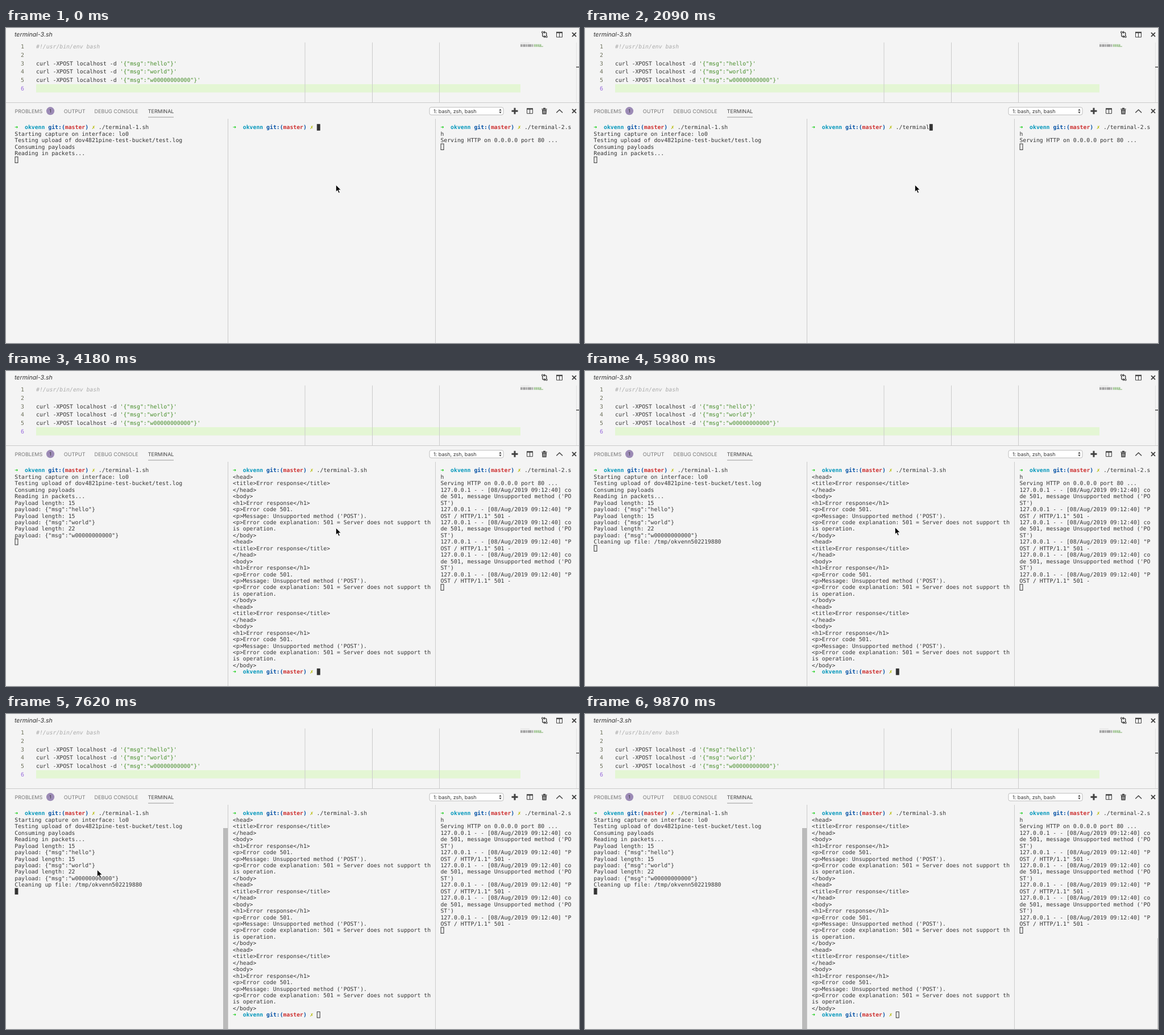
An HTML page for the animation above (9970 ms loop, 1008 px wide and 555 px high).

```html
<!DOCTYPE html>
<html lang="en">
<head>
<meta charset="utf-8">
<title>Terminal session</title>
<style>
html, body { margin: 0; width: 100%; height: 100%; overflow: hidden; background: #f4f4f4; }
svg { display: block; width: 100vw; height: 100vh; }
text { white-space: pre; text-rendering: geometricPrecision; fill: #333; }
.mono { font: 9.8px "DejaVu Sans Mono", "Liberation Mono", monospace; }
.ui { font: 9px Inter, "Open Sans", sans-serif; }
</style>
</head>
<body>
<svg id="stage" viewBox="0 0 1008 555" xmlns="http://www.w3.org/2000/svg"></svg>
<script>
const LOOP = 9970;
const CELL = 5.9, ROW = 11.45, TOP = 169.25, BASE = 9.1;
const INK = '#333', ICON = '#424242', RULE = '#cbcbcb';
const PANES = { left: 15.3, mid: 399.1, right: 764.4 };
const USER = 'okvenn';
const stage = document.getElementById('stage');

function add(parent, tag, attrs, content) {
  const node = document.createElementNS(stage.namespaceURI, tag);
  set(node, attrs);
  if (content !== undefined) node.textContent = content;
  parent.appendChild(node);
  return node;
}
function set(node, attrs) {
  for (const key in attrs) node.setAttribute(key, attrs[key]);
}
function show(node, on) {
  node.style.display = on ? '' : 'none';
}
const group = () => add(stage, 'g', {});
const box = (x, y, width, height, fill, parent = stage) =>
  add(parent, 'rect', { x, y, width, height, fill });
const stroke = (d, width = 1, color = ICON) =>
  add(stage, 'path', { d, fill: 'none', stroke: color, 'stroke-width': width });
const solid = d => add(stage, 'path', { d, fill: ICON });
const mono = (parent, x, y, content, style = '') =>
  add(parent, 'text', { class: 'mono', x, y, style }, content);
const ui = (x, y, content, style = '') =>
  add(stage, 'text', { class: 'ui', x, y, style }, content);

// Terminal text on a character grid
const cell = (parent, pane, col, row, content, style) =>
  mono(parent, PANES[pane] + col * CELL, TOP + BASE + row * ROW, content, style);
function lines(parent, pane, row, list) {
  list.forEach((content, i) => cell(parent, pane, 0, row + i, content));
}
function prompt(parent, pane, row, command = '') {
  const parts = [
    [0, '➜', '#14ce14', 'bold'], [3, USER, '#0598bc', 'bold'],
    [10, 'git:(', '#0451a5', 'bold'], [15, 'master', '#cd3131', 'bold'],
    [21, ')', '#0451a5', 'bold'], [23, '✗', '#b5ba00', 'normal']
  ];
  for (const [col, content, fill, weight] of parts)
    cell(parent, pane, col, row, content, `fill:${fill};font-weight:${weight}`);
  return cell(parent, pane, 25, row, command);
}
const thrice = list => [...list, ...list, ...list];

function drawEditor() {
  ui(15, 15.2, 'terminal-3.sh', 'font-size:10.6px;font-style:italic');
  box(53, 99, 852, 14.5, '#e4f6d4');
  for (const x of [525.5, 644, 762]) box(x, 25.5, 1, 106, RULE);
  const request = 'curl -XPOST localhost -d ';
  const bodies = ['hello', 'world', 'w00000000000'];
  for (let n = 1; n <= 6; n++) {
    const y = 36.1 + (n - 1) * 14.7;
    mono(stage, 26, y, n, `fill:${n === 6 ? '#9769dc' : '#6d705b'}`);
    if (n === 1) mono(stage, 53, y, '#!/usr/bin/env bash', 'fill:#aaa;font-style:italic');
    if (n > 2 && n < 6) {
      mono(stage, 53, y, request);
      mono(stage, 53 + request.length * CELL, y, `'{"msg":"${bodies[n - 3]}"}'`, 'fill:#448c27');
    }
  }
  drawMinimap();
  box(1003, 25.5, 1, 106, '#e2e2e2');
  box(1003, 68, 5, 1.6, '#555');
  box(0, 131, 1008, 1, RULE);
}

function drawMinimap() {
  box(905, 25.6, 16, 1, '#e0e0e0');
  for (const [x, w] of [[905, 3.5], [909.3, 5], [915, 2.2], [918, 6.5], [925.5, 2]])
    box(x, 28.6, w, 4.6, '#a3a3a3');
  for (let i = 0; i < 4; i++) box(929 + i * 3.3, 28.6, 2.6, 4.6, '#a4c797');
  box(938, 31.8, 7, 1.4, '#a4c797');
}

function cross(x, y) {
  stroke(`M${x - 3.5} ${y - 3.5}l7 7m0 -7l-7 7`, 1.9);
}
function split(x, y) {
  stroke(`M${x - 5} ${y - 4}h10v8.4h-10zM${x} ${y - 4}v8.4`);
  box(x - 5.5, y - 5, 11, 2.4, ICON);
}

function drawIcons() {
  // Compare changes
  stroke('M943.8 9v4.2q0 2 2 2h1.5M950.8 14v-4.4q0-2-2-2h-1.5', 1.4);
  solid('M946.6 12.6l3 2.6-3 2.6zM948 5l-3 2.6 3 2.6z');
  for (const [cx, cy] of [[943.8, 7.4], [950.8, 15.4]])
    add(stage, 'circle', { cx, cy, r: 1.4, fill: '#f4f4f4', stroke: ICON, 'stroke-width': 1.1 });
  split(973.5, 11.7);
  cross(999.5, 11.7);

  stroke('M889.5 146.3h11M895 140.8v11', 3);
  split(921.5, 146.3);
  // Trash can
  solid('M943 144h8l-.5 8h-7zM942.3 142.2h9.4v1.2h-9.4zM945 140.7h4v1.5h-4z');
  stroke('M945.4 145.2v5.6M947 145.2v5.6M948.6 145.2v5.6', .7, '#f4f4f4');
  stroke('M968.3 149.3l5.4-5.4 5.4 5.4', 1.4);
  cross(999.5, 146.3);
}

function drawPanelHeader() {
  const tabs = [[15.5, 'PROBLEMS'], [101.8, 'OUTPUT'], [155.6, 'DEBUG CONSOLE'], [249.8, 'TERMINAL']];
  for (const [x, label] of tabs)
    ui(x, 149.6, label, `fill:${label === 'TERMINAL' ? ICON : '#757575'}`);
  box(250, 156.6, 45, 1, '#9a9a9a');
  add(stage, 'circle', { cx: 78, cy: 146.2, r: 7.1, fill: '#9c8bb6' });
  ui(78, 149.1, '1', 'font-size:8px;text-anchor:middle');
  add(stage, 'rect', { x: 745, y: 139.7, width: 130, height: 13.4, rx: 3, fill: '#fff', stroke: '#bdbdbd', 'stroke-width': 1 });
  ui(752, 149.6, '1: bash, zsh, bash');
  solid('M867.3 145.4l2.2-3 2.2 3zM867.3 147.4l2.2 3 2.2-3z');
  for (const x of [390, 755]) box(x, 160, 1, 395, RULE);
}

drawEditor();
drawIcons();
drawPanelHeader();

// Always visible terminal text
const base = group();
prompt(base, 'left', 0, './terminal-1.sh');
lines(base, 'left', 1, [
  'Starting capture on interface: lo0',
  'Testing upload of dov4821pine-test-bucket/test.log',
  'Consuming payloads',
  'Reading in packets...'
]);
const typed = prompt(base, 'mid', 0);
prompt(base, 'right', 0, './terminal-2.s');
lines(base, 'right', 1, ['h', 'Serving HTTP on 0.0.0.0 port 80 ...']);

// Output of the three requests
const output = group();
['hello', 'world', 'w00000000000'].forEach((msg, i) => {
  const payload = `{"msg":"${msg}"}`;
  lines(output, 'left', 5 + 2 * i, [`Payload length: ${payload.length}`, `payload: ${payload}`]);
});
lines(output, 'mid', 1, thrice([
  '<head>', '<title>Error response</title>', '</head>', '<body>',
  '<h1>Error response</h1>', '<p>Error code 501.',
  "<p>Message: Unsupported method ('POST').",
  '<p>Error code explanation: 501 = Server does not support th',
  'is operation.', '</body>'
]));
prompt(output, 'mid', 31);
const stamp = '127.0.0.1 - - [08/Aug/2019 09:12:40] ';
lines(output, 'right', 3, thrice([
  stamp + 'co', "de 501, message Unsupported method ('PO", "ST')",
  stamp + '"P', 'OST / HTTP/1.1" 501 -'
]));

const cleanup = group();
lines(cleanup, 'left', 11, [`Cleaning up file: /tmp/${USER}502219880`]);

const leftBar = box(382, 201, 8, 354, '#bababa');
const rightBar = box(1007, 395, 1, 160, '#c4c4c4');

const carets = {};
for (const pane in PANES) carets[pane] = add(stage, 'rect', { stroke: INK, 'stroke-width': 1 });
function placeCaret(pane, col, row, focused) {
  set(carets[pane], {
    x: PANES[pane] + col * CELL + .7, y: TOP + row * ROW + .5,
    width: CELL - 1, height: ROW - 1, fill: focused ? INK : 'none'
  });
}

const pointer = add(stage, 'path', {
  d: 'M0 0V12.2L2.8 9.6L4.8 14.3L6.9 13.4L4.9 8.8H8.7Z',
  fill: '#000', stroke: '#fff', 'stroke-width': .8
});

// [time, value...] steps; each holds until the next
const COMMAND = './terminal-3.sh ';
const KEYS = [
  [0, 0], [600, 1], [750, 2], [900, 3], [1200, 4], [1350, 6], [1490, 7],
  [1640, 8], [1790, 9], [2090, 10], [3140, 11], [3290, 12], [3430, 16]
];
const MOVES = [
  [0, 580, 276], [5980, 545, 275], [6130, 440, 272], [6280, 300, 267],
  [6430, 210, 263], [6580, 170, 261], [6730, 158, 260], [7020, 157, 267],
  [7170, 150, 267], [7470, 153, 269], [7620, 160, 274], [7770, 168, 279],
  [7920, 173, 282], [8520, 382, 306], [8670, 600, 355], [8820, 798, 412],
  [9120, 885, 468], [9270, 948, 512], [9420, 990, 543], [9570, 1020, 570]
];
function stepAt(steps, t) {
  let now = steps[0];
  for (const step of steps) if (step[0] <= t) now = step;
  return now;
}

function render(t) {
  const done = t >= 4180, cleaned = t >= 4480, leftFocus = t >= 6730;
  const count = stepAt(KEYS, t)[1];
  const [, x, y] = stepAt(MOVES, t);
  typed.textContent = COMMAND.slice(0, count);
  show(output, done);
  show(cleanup, cleaned);
  show(leftBar, t >= 6280);
  show(rightBar, t >= 8820);
  placeCaret('left', 0, cleaned ? 12 : done ? 11 : 5, leftFocus);
  placeCaret('mid', done ? 25 : 25 + count, done ? 31 : 0, !leftFocus);
  placeCaret('right', 0, done ? 18 : 3, false);
  set(pointer, { transform: `translate(${x + .4} ${y + .5})` });
}

const start = performance.now();
function tick() {
  render((performance.now() - start) % LOOP);
  requestAnimationFrame(tick);
}
tick();
</script>
</body>
</html>
```
